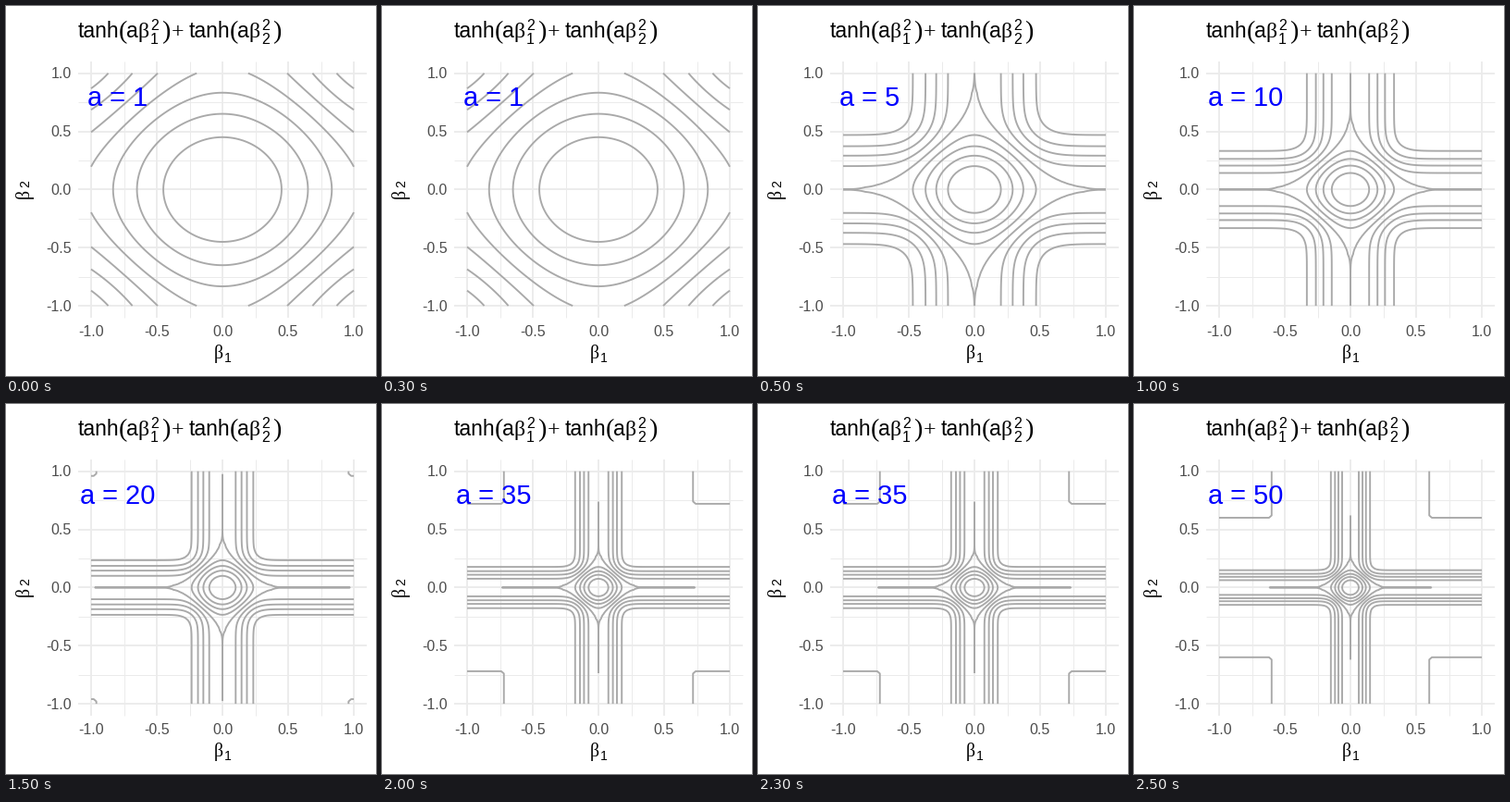
These frames come from a looping animation (400x400 px, 3 s). A matplotlib script:

```python
import numpy as np
import matplotlib.pyplot as plt
from matplotlib.animation import FuncAnimation
from matplotlib.patches import Rectangle

DPI = 100
PT = 72 / DPI  # points per pixel
SANS, SERIF = "Liberation Sans", "Liberation Serif"
SCALES = [1, 5, 10, 20, 35, 50]
GREY = "#a9a9a9"
STEP = 0.02
LINE = dict(lw=1.9 * PT, color=GREY, solid_capstyle="butt")

fig = plt.figure(figsize=(4, 4), dpi=DPI, facecolor="white")
ax = fig.add_axes([0, 0, 1, 1])
ax.set(xlim=(0, 400), ylim=(400, 0))
ax.axis("off")


def px(b):
    return 234 + 142 * b


def py(b):
    return 198.4 - 125.7 * b


def text(x, y, s, size, color="black", font=SANS, ha="left", **kw):
    kw.setdefault("va", "baseline")
    return ax.text(x, y, s, fontsize=size * PT, color=color, family=font,
                   ha=ha, **kw)


def grid(values, width):
    style = dict(color="#ebebeb", lw=width * PT, solid_capstyle="butt", zorder=1)
    for v in values:
        ax.plot([px(v)] * 2, [py(-1.1), py(1.1)], **style)
        ax.plot([px(-1.1), px(1.1)], [py(v)] * 2, **style)


def tanh_term(x, index):
    """Draw tanh(a beta_index^2) with its left edge at x."""
    text(x, 34, "tanh", 23)
    text(x + 43.5, 35, "(", 28, font=SERIF)
    text(x + 52, 34, "a", 23)
    text(x + 64.5, 34, "β", 24, font=SERIF)
    text(x + 78, 25.5, "2", 16)
    text(x + 78, 41, index, 16)
    text(x + 90, 35, ")", 28, font=SERIF)


grid([-0.75, -0.25, 0.25, 0.75], 0.95)
grid([-1, -0.5, 0, 0.5, 1], 1.9)

for v in (-1, -0.5, 0, 0.5, 1):
    text(px(v), 357, f"{v:.1f}", 16, "#4d4d4d", ha="center")
    text(70.5, py(v) + 5.7, f"{v:.1f}", 16, "#4d4d4d", ha="right")

tanh_term(78, "1")
text(178.5, 34, "+", 24, font=SERIF)
tanh_term(198, "2")

text(224.5, 381, "β", 20, font=SERIF)
text(235.5, 385, "1", 14)
text(24, 208, "β", 20, font=SERIF, rotation=90, ha="right", va="bottom").set(
    ha="center", x=20)
text(28, 196.5, "2", 14, rotation=90, ha="right", va="bottom")

label = text(px(-0.8), 108, "", 29, "blue", ha="center", zorder=5)

beta = np.arange(-50, 51) * STEP
X, Y = np.meshgrid(beta, beta)
LEVELS = [0.2, 0.4, 0.6, 0.8, np.nextafter(1, 0), 1.2, 1.4, 1.6, 1.8]
drawn = []


def draw_plateaus(a):
    """Outline the corners where both terms saturate to 1."""
    edge = np.ceil(np.sqrt(17.8 / a) / STEP) * STEP
    if edge >= 1:
        return
    u = np.array([edge, edge, edge + STEP, 1])
    for sx in (-1, 1):
        for sy in (-1, 1):
            drawn.extend(ax.plot(px(sx * u), py(sy * u[::-1]), zorder=3, **LINE))


def update(i):
    while drawn:
        drawn.pop().remove()
    a = SCALES[i]
    Z = np.tanh(a * X**2) + np.tanh(a * Y**2)
    drawn.append(ax.contour(px(X), py(Y), Z, levels=LEVELS, colors=GREY,
                            linewidths=1.9 * PT, zorder=3))
    draw_plateaus(a)
    label.set_text(f"a = {a}")
    return [label]


anim = FuncAnimation(fig, update, frames=len(SCALES), interval=500,
                     init_func=lambda: [label], repeat=True, repeat_delay=0)
plt.show()
```
